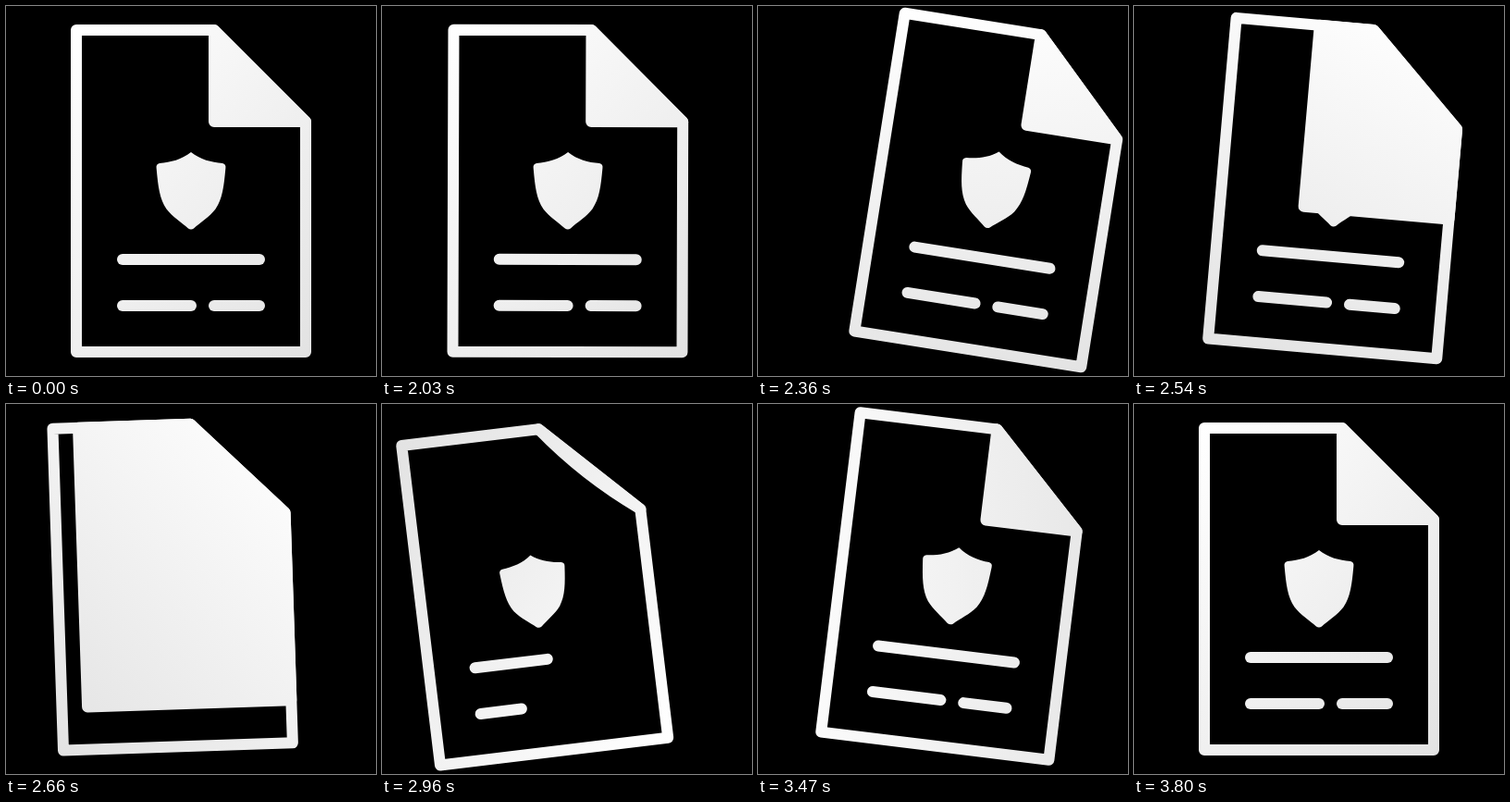
These frames come from a looping animation (400 by 400 pixels, 3830 ms). An HTML page with a canvas:

```html
<!DOCTYPE html>
<html lang="en">
<head>
<meta charset="utf-8">
<title>Shielded document</title>
<style>
html, body { margin: 0; width: 100%; height: 100%; overflow: hidden; background: #000; }
canvas { display: block; width: 400px; height: 400px; }
</style>
</head>
<body>
<canvas id="stage" width="400" height="400"></canvas>
<script>
const ctx = document.getElementById('stage').getContext('2d');
const LOOP = 3830, SWAP = 2700, DEG = Math.PI / 180;

const mix = (a, b, p) => a + (b - a) * p;

// Sine ease from 0 at time a to 1 at time b.
function ramp(t, a, b) {
  const p = Math.min(1, Math.max(0, (t - a) / (b - a)));
  return 0.5 - 0.5 * Math.cos(Math.PI * p);
}

// The page swings right, left, right again and comes to rest.
const shiftX = t => 54 * ramp(t, 2000, 2360) - 93 * ramp(t, 2360, 2790)
  + 53 * ramp(t, 2870, 3370) - 14 * ramp(t, 3390, 3770);
const shiftY = t => -3.5 * ramp(t, 2200, 2660) + 6.5 * ramp(t, 2660, 2930)
  - 6 * ramp(t, 2930, 3400) + 3 * ramp(t, 3600, 3800);
const tilt = t => 9 * ramp(t, 2000, 2360) - 16.4 * ramp(t, 2400, 2830)
  + 14.4 * ramp(t, 2890, 3480) - 7 * ramp(t, 3480, 3720);

const shieldTurn = t => -14 * ramp(t, 2960, 3210) + 14 * ramp(t, 3210, 3500);
const shieldSize = t => 0.8 + 0.27 * ramp(t, 2700, 3200) - 0.07 * ramp(t, 3200, 3500);

const sheet = new Path2D('M76 26H225L324 125V374H76Z');
const shield = new Path2D(
  'M0 -42C10 -34 22 -31 34 -30Q38 -29 37.4 -25C35.5 -4 34 8 26.5 19.5' +
  'C20 28 10 34 3 40.5Q0 42.5 -3 40.5C-10 34 -20 28 -26.5 19.5' +
  'C-34 8 -35.5 -4 -37.4 -25Q-38 -29 -34 -30C-22 -31 -10 -34 0 -42Z');

// Diagonal shading that makes one turn around the page centre.
function shadeAt(t) {
  const a = (45 + 360 * ramp(t, 2000, 3950)) * DEG;
  const x = 210 * Math.cos(a), y = 210 * Math.sin(a);
  const g = ctx.createLinearGradient(-x, -y, x, y);
  g.addColorStop(0, '#fff');
  g.addColorStop(1, '#e3e3e3');
  return g;
}

function paint(path) {
  ctx.fill(path);
  ctx.stroke(path);
}

function bar(x, y, length) {
  if (length <= 0) return;
  ctx.beginPath();
  ctx.moveTo(x, y);
  ctx.lineTo(x + length, y);
  ctx.stroke();
}

function drawShield(t) {
  ctx.save();
  if (t >= SWAP) {
    const size = shieldSize(t);
    ctx.rotate(shieldTurn(t) * DEG);
    ctx.scale(size, size);
  }
  ctx.fill(shield);
  ctx.restore();
}

function drawBars(t) {
  const fresh = t >= SWAP;
  const upper = 148 * (fresh ? ramp(t, 2515, 3372) : 1);
  const lower = 123 * (fresh ? ramp(t, 2541, 3562) : 1);
  bar(126, 274, upper);
  bar(126, 324, Math.min(74, lower));
  bar(225, 324, lower - 74);
}

// The flap grows from the corner until it covers the sheet.
function drawFlap(t) {
  const p = ramp(t, 2360, 2780);
  const x = mix(225, 76, p), y = mix(125, 374, p);
  paint(new Path2D(`M225 26L324 125V${y}H${x}V26Z`));
}

// The covering page is pulled off towards the lower left.
function drawPeel(t) {
  const d = mix(-210, 310, ramp(t, 2770, 2925));
  ctx.save();
  ctx.beginPath();
  ctx.moveTo(-100, -100 + d);
  ctx.lineTo(500, 500 + d);
  ctx.lineTo(-100, 1100 + d);
  ctx.clip();
  paint(sheet);
  ctx.restore();
}

// A new corner bends over, round at first and then creased.
function drawCurl(t) {
  const bend = 49.5 * (1 - ramp(t, 2849, 3313));
  const round = 1 - ramp(t, 3000, 3450);
  const x = 225 + bend, y = 125 - bend;
  const ax = mix(x, 225, round), ay = mix(y, 26, round);
  const bx = mix(x, 324, round), by = mix(y, 125, round);
  paint(new Path2D(`M225 26L${ax} ${ay}Q${x} ${y} ${bx} ${by}L324 125Z`));
}

function draw(t) {
  ctx.setTransform(1, 0, 0, 1, 0, 0);
  ctx.fillStyle = '#000';
  ctx.fillRect(0, 0, 400, 400);

  ctx.translate(200 + shiftX(t), 200 + shiftY(t));
  ctx.rotate(tilt(t) * DEG);
  ctx.lineWidth = 12;
  ctx.lineCap = ctx.lineJoin = 'round';
  ctx.fillStyle = ctx.strokeStyle = shadeAt(t);
  drawShield(t);

  // Keep the shading centred while the page uses its own corner origin.
  const shade = shadeAt(t);
  ctx.translate(-200, -200);
  ctx.fillStyle = ctx.strokeStyle = centred(shade, t);
  ctx.stroke(sheet);
  drawBars(t);
  if (t < 2780) {
    drawFlap(t);
  } else {
    if (t < 2925) drawPeel(t);
    drawCurl(t);
  }
}

function centred(shade, t) {
  const a = (45 + 360 * ramp(t, 2000, 3950)) * DEG;
  const x = 210 * Math.cos(a), y = 210 * Math.sin(a);
  const g = ctx.createLinearGradient(200 - x, 200 - y, 200 + x, 200 + y);
  g.addColorStop(0, '#fff');
  g.addColorStop(1, '#e3e3e3');
  return g;
}

const start = performance.now();
function tick() {
  draw((performance.now() - start) % LOOP);
  requestAnimationFrame(tick);
}
tick();
</script>
</body>
</html>
```
